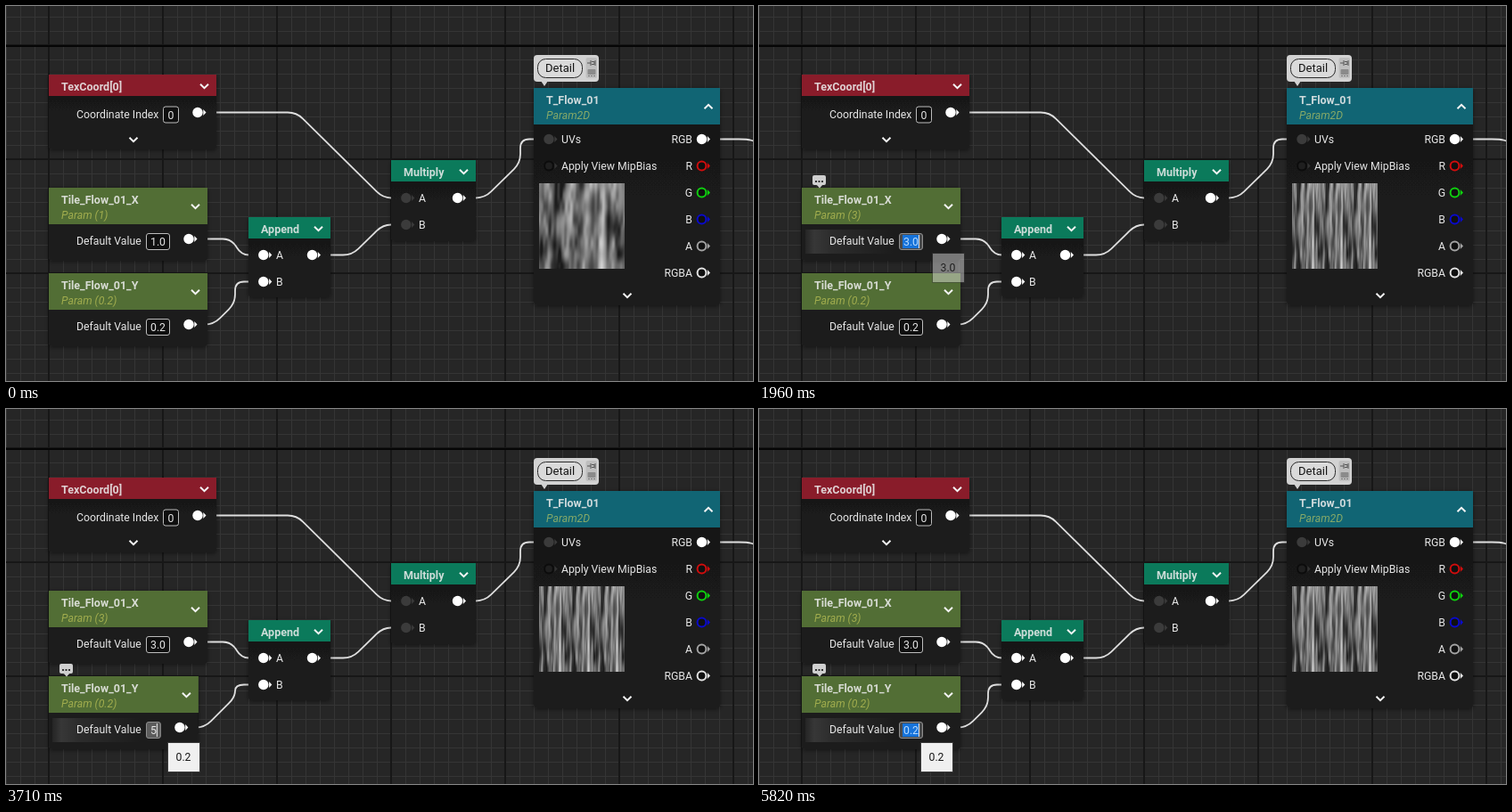
Animation, 838 px wide and 421 px high, one loop 5.84 s. Source, as an HTML page with a canvas:

```html
<!DOCTYPE html>
<html lang="en">
<head>
<meta charset="utf-8">
<title>Material graph</title>
<style>
  html, body { margin: 0; width: 100%; height: 100%; overflow: hidden; background: #262626; }
  svg, canvas { position: absolute; display: block; }
  svg { left: 0; top: 0; }
  canvas { left: 598px; top: 199px; }
  text { font: 12.25px Roboto, "Open Sans", sans-serif; fill: #e6e6e6; white-space: pre; }
  .title { font-weight: 700; font-size: 12.5px; fill: rgba(238, 238, 238, .86); }
  .sub { font-style: italic; fill: rgba(218, 218, 96, .58); }
  .end { text-anchor: end; }
  .dark { fill: #151515; }
  .big { font-size: 13px; }
  .note { fill: #666; }
  .wire { fill: none; stroke: #dedede; stroke-width: 1.8; }
  .chevron { fill: none; stroke: #f4f4f4; stroke-width: 2; }
</style>
</head>
<body>
<svg id="stage" width="838" height="421" viewBox="0 0 838 421">
  <defs>
    <pattern id="grid" width="16" height="16" y="12" patternUnits="userSpaceOnUse">
      <path d="M0 .5H16M.5 0V16" stroke="#353535"/>
    </pattern>
    <pattern id="rules" width="128" height="128" x="47" y="43" patternUnits="userSpaceOnUse">
      <path d="M0 1H128M1 0V128" stroke="#171717" stroke-width="2"/>
    </pattern>
    <linearGradient id="rowGlow">
      <stop offset="0" stop-color="#fff" stop-opacity=".04"/>
      <stop offset=".1" stop-color="#fff" stop-opacity=".12"/>
      <stop offset=".3" stop-color="#fff" stop-opacity=".07"/>
      <stop offset="1" stop-color="#fff" stop-opacity="0"/>
    </linearGradient>
    <linearGradient id="body" x2="0" y2="1">
      <stop offset="0" stop-color="#171717"/>
      <stop offset="1" stop-color="#1d1d1d"/>
    </linearGradient>
    <filter id="shadow" x="-20%" y="-20%" width="140%" height="140%">
      <feDropShadow dx="0" dy="1" stdDeviation="2.5" flood-color="#000" flood-opacity=".5"/>
    </filter>
  </defs>
  <rect width="838" height="421" fill="#262626"/>
  <rect width="838" height="421" fill="url(#grid)"/>
  <rect width="838" height="421" fill="url(#rules)"/>
  <rect y="44" width="838" height="2" fill="#060606"/>
</svg>
<canvas id="preview" width="96" height="96"></canvas>
<script>
const LOOP = 5840;
const stage = document.getElementById('stage');

function add(parent, tag, attrs = {}, text) {
  const el = document.createElementNS('http://www.w3.org/2000/svg', tag);
  set(el, attrs);
  if (text !== undefined) el.textContent = text;
  parent.append(el);
  return el;
}
function set(el, attrs) {
  for (const key in attrs) el.setAttribute(key, attrs[key]);
}
const group = parent => add(parent, 'g');
const label = (parent, x, y, text, cls = '') => add(parent, 'text', { x, y, class: cls }, text);
const move = (el, x, y = 0) => set(el, { transform: `translate(${x} ${y})` });
const ramp = (t, from, to) => Math.min(1, Math.max(0, (t - from) / (to - from)));

// ---- wires ----
function rounded(points, radius = 10) {
  let d = `M${points[0]}`;
  for (let i = 1; i < points.length - 1; i++) {
    const [x, y] = points[i];
    const near = ([px, py]) => {
      const len = Math.hypot(px - x, py - y), r = Math.min(radius, len / 2) / len;
      return [x + (px - x) * r, y + (py - y) * r];
    };
    d += `L${near(points[i - 1])}Q${x},${y} ${near(points[i + 1])}`;
  }
  return d + `L${points[points.length - 1]}`;
}
const wires = group(stage);
const wire = (...points) => add(wires, 'path', { class: 'wire', d: rounded(points) });

wire([225, 119.5], [326, 119.5], [423, 215.5], [441, 215.5]);
wire([354, 279.5], [388, 279.5], [423, 245.5], [441, 245.5]);
wire([516, 215.5], [537, 215.5], [577, 176], [577, 149.5], [600, 149.5]);
wire([790, 149.5], [832, 149.5], [840, 152]);
const wireX = wire([0, 0], [1, 1]);
const wireY = wire([0, 0], [1, 1]);

function placeWires(dx, dy) {
  const a = 253 + dx;
  set(wireX, { d: rounded([[200, 261.5], [a, 261.5], [Math.min(a + 18, 264), 279.5], [281, 279.5]]) });
  const b = 233 + dy;
  set(wireY, { d: rounded([[190, 357.5], [b, 357.5], [257, 100.5 + b], [257, 309.5], [281, 309.5]]) });
}

// ---- node parts ----
function frame(x, y, w, h, headH, color) {
  const g = group(stage);
  const body = add(g, 'rect', { x, y, width: w, height: h, rx: 4, fill: 'url(#body)', filter: 'url(#shadow)' });
  const head = add(g, 'rect', { x, y, width: w, height: headH, fill: color });
  return { g, parts: [body, head] };
}
const chevron = (parent, x, y, up = 1) =>
  add(parent, 'path', { class: 'chevron', d: `M${x - 4.5} ${y - 2.2 * up}L${x} ${y + 2.2 * up}L${x + 4.5} ${y - 2.2 * up}` });

function pin(parent, x, y, color = '#fff', ring = false) {
  add(parent, 'circle', ring
    ? { cx: x, cy: y, r: 4.9, fill: '#101010', stroke: color, 'stroke-width': 2 }
    : { cx: x, cy: y, r: 5.7, fill: color });
  add(parent, 'path', { d: `M${x + 6.3} ${y - 3.4}L${x + 9.5} ${y}L${x + 6.3} ${y + 3.4}z`, fill: color });
}
const inputBox = (parent, x, y, w) => add(parent, 'rect',
  { x: x + .5, y: y + .5, width: w - 1, height: 18, rx: 2.5, fill: '#0f0f0f', stroke: '#bdbdbd' });

// ---- fixed nodes ----
{
  const { g } = frame(48, 77, 188, 84, 24, '#891c2a');
  label(g, 62, 95, 'TexCoord[0]', 'title');
  chevron(g, 222.5, 90);
  label(g, 79, 126, 'Coordinate Index');
  inputBox(g, 176, 112.5, 18);
  label(g, 181.5, 126.5, '0');
  pin(g, 215, 119.5);
  chevron(g, 143, 150);
}
function mathNode(x, y, w, h, name, pinColor) {
  const { g } = frame(x, y, w, h, 24, '#0b7a5b');
  label(g, x + 14, y + 18, name, 'title');
  chevron(g, x + w - 13.5, y + 13);
  ['A', 'B'].forEach((side, i) => {
    const py = y + 42.5 + 30 * i;
    pin(g, x + 16.8, py, pinColor);
    label(g, x + 31, py + 4.5, side);
  });
  pin(g, x + w - 20.5, y + 42.5);
}
mathNode(272, 237, 92, 90, 'Append', '#fff');
mathNode(432, 173, 95, 91, 'Multiply', '#3b3b3b');
{
  const { g } = frame(592, 92, 209, 244, 41, '#116574');
  label(g, 606, 110, 'T_Flow_01', 'title');
  label(g, 606, 127, 'Param2D', 'sub');
  chevron(g, 788, 113, -1);
  pin(g, 609, 149.5, '#3b3b3b');
  label(g, 623, 154, 'UVs');
  add(g, 'path', { d: 'M615.3 176L618.5 179.5L615.3 183z', fill: '#333' });
  add(g, 'circle', { cx: 609, cy: 179.5, r: 4.9, fill: '#1f1f1f', stroke: '#0c0c0c', 'stroke-width': 2 });
  label(g, 623, 184, 'Apply View MipBias');
  const outs = { RGB: '#fff', R: '#d00d0d', G: '#0fd00f', B: '#0a0acc', A: '#a3a3a3', RGBA: '#e4e4e4' };
  Object.entries(outs).forEach(([name, color], i) => {
    const y = 149.5 + 30 * i;
    label(g, 770, y + 4.5, name, 'end');
    pin(g, 780.5, y, color, i > 0);
  });
  chevron(g, 697, 325);
}

// ---- "Detail" comment ----
{
  const g = group(stage);
  add(g, 'path', { d: 'M600 84H608L604 90z', fill: '#d2d2d2' });
  add(g, 'rect', { x: 592, y: 55, width: 73, height: 30, rx: 4, fill: '#d2d2d2' });
  add(g, 'rect', { x: 596.5, y: 59.5, width: 50, height: 21, rx: 9, fill: '#dadada', stroke: '#2b2b2b' });
  label(g, 605, 74.3, 'Detail', 'dark big');
  add(g, 'rect', { x: 650.5, y: 58, width: 12.5, height: 23, rx: 2, fill: '#bebebe' });
  add(g, 'path', { d: 'M652 64H656M656 61V67M657 62.5H660V65.5H657M661 61V67', stroke: '#555', fill: 'none' });
  add(g, 'path', { d: 'M653 72.5H661M653 78.5H661', stroke: '#777', 'stroke-dasharray': '2 1' });
  add(g, 'rect', { x: 652.5, y: 71, width: 9, height: 6, rx: 1, fill: '#8b8b8b' });
}

// ---- editable parameter nodes ----
const textWidth = s => [...s].reduce((w, c) => w + (c === '.' ? 3.2 : 6.9), 0);

function paramNode(y, name) {
  const { g, parts } = frame(48, y, 178, 82, 41, '#526e35');
  label(g, 62, y + 18, name, 'title');
  const sub = label(g, 62, y + 34.5, '', 'sub');
  const glow = add(g, 'rect', { x: 52, y: y + 47, width: 100, height: 27, fill: 'url(#rowGlow)' });
  label(g, 79, y + 64, 'Default Value');
  const box = inputBox(g, 157, y + 51, 27);
  const mark = add(g, 'rect', { x: 161, y: y + 53, height: 15, fill: '#1673da' });
  const value = label(g, 162, y + 64.5, '');
  const caret = add(g, 'rect', { y: y + 53, width: 1, height: 15, fill: '#e9e9e9' });
  const right = group(g);
  chevron(right, 212.5, y + 21);
  pin(right, 205, y + 57.5);

  const bubble = group(stage);
  add(bubble, 'path', { d: `M64 ${y - 4}H72L68 ${y + .5}z`, fill: '#cfcfcf' });
  add(bubble, 'rect', { x: 60, y: y - 14, width: 15, height: 11, rx: 2, fill: '#cfcfcf' });
  for (const x of [63, 66.5, 70]) add(bubble, 'rect', { x, y: y - 8, width: 2, height: 2, fill: '#333' });

  return {
    // Returns how far the right side moved with the value's width.
    update({ text, mode, param, hover, caretAlpha, bubbleAlpha }) {
      const w = textWidth(text), shift = w - 17;
      const active = mode !== 'idle';
      parts.forEach(p => set(p, { width: 178 + shift }));
      set(box, { width: w + 9, fill: active ? (mode === 'select' ? '#4a4a4a' : '#5c5c5c') : '#0f0f0f',
                 stroke: active ? '#8f8f8f' : '#bdbdbd' });
      set(mark, { width: w + 2, opacity: mode === 'select' ? 1 : 0 });
      set(caret, { x: mode === 'press' ? 172 : 162 + w, opacity: active ? caretAlpha : 0 });
      value.style.fill = mode === 'select' ? '#b9dcff' : mode === 'press' ? '#b5b5b5' : '';
      value.textContent = text;
      sub.textContent = `Param (${param})`;
      set(glow, { opacity: hover ? 1 : 0 });
      set(bubble, { opacity: bubbleAlpha });
      move(right, shift);
      return shift;
    }
  };
}
const nodeX = paramNode(204, 'Tile_Flow_01_X');
const nodeY = paramNode(300, 'Tile_Flow_01_Y');

// ---- tooltips ----
function tooltip(w, h, lines) {
  const g = group(stage);
  add(g, 'rect', { x: .5, y: .5, width: w - 1, height: h - 1, fill: '#f0f0f0', stroke: '#3a3a3a' });
  const texts = lines.map(([y, text, cls]) => label(g, 9.5, y, text, cls));
  return (alpha, x, y, text) => {
    set(g, { opacity: alpha });
    move(g, x, y);
    if (text) texts[0].textContent = text;
  };
}
const bigTip = tooltip(140, 64, [[20, "'Tile_Flow_01_Y'", 'dark'], [34, 'Param (0.2)', 'dark'],
                                 [52.5, 'hold (Ctrl + Alt) for more', 'note']]);
const tipX = tooltip(37, 34, [[21, '', 'dark']]);
const tipY = tooltip(37, 34, [[21, '', 'dark']]);

// ---- tiling flow texture ----
const wrap = (n, m) => ((n % m) + m) % m;
function hash(x, y, seed) {
  let n = Math.imul(x + 1, 374761393) ^ Math.imul(y + 1, 668265263) ^ Math.imul(seed, 974634781);
  n = Math.imul(n ^ (n >>> 13), 1274126177);
  return ((n ^ (n >>> 16)) >>> 0) / 4294967296;
}
function noise(u, v, nx, ny) {
  const x = u * nx, y = v * ny, ix = Math.floor(x), iy = Math.floor(y);
  const ease = f => f * f * (3 - 2 * f);
  const fx = ease(x - ix), fy = ease(y - iy);
  const at = (i, j) => hash(wrap(ix + i, nx), wrap(iy + j, ny), nx);
  const top = at(0, 0) + (at(1, 0) - at(0, 0)) * fx;
  const low = at(0, 1) + (at(1, 1) - at(0, 1)) * fx;
  return top + (low - top) * fy;
}
const streaks = [.11, .32, .55, .72, .86];
function flow(u, v) {
  const bend = u + .02 * Math.sin(2 * Math.PI * (v - .1));
  const ridge = streaks.reduce((s, c) => {
    const d = wrap(bend - c + .5, 1) - .5;
    return s + Math.exp(-d * d / .0024);
  }, 0);
  const near = .5 + .5 * Math.cos(2 * Math.PI * (v - .1));
  const cloud = .4 * noise(bend, v, 8, 10) + .35 * noise(bend, v, 16, 20) + .25 * noise(bend, v, 32, 36);
  return 255 * Math.min(.88, Math.max(.1, .42 + 1.1 * (cloud - .5) + .28 * near * (ridge - .5)));
}
const preview = document.getElementById('preview').getContext('2d');
function bake(tileX, tileY) {
  const image = preview.createImageData(96, 96);
  for (let p = 0; p < 96 * 96; p++) {
    const x = p % 96, y = Math.floor(p / 96);
    let sum = 0;
    for (const ox of [.25, .75]) for (const oy of [.25, .75])
      sum += flow((x + ox) / 96 * tileX, (y + oy) / 96 * tileY);
    image.data.set([sum / 4, sum / 4, sum / 4, 255], p * 4);
  }
  return image;
}
const textures = { wide: bake(1, .2), narrow: bake(3, .2), dense: bake(3, 5) };

// ---- timeline ----
const at = (keys, t) => keys.reduce((now, key) => (t >= key[0] ? key : now));
const editX = [[0, '1.0', 'idle'], [910, '1.0', 'press'], [930, '1.0', 'select'], [1510, '3', 'type'],
               [1770, '3.0', 'select'], [3070, '3.0', 'idle']];
const editY = [[0, '0.2', 'idle'], [3070, '0.2', 'select'], [3640, '5', 'type'], [3820, '5.0', 'select'],
               [4850, '.', 'type'], [4890, '.2', 'type'], [5090, '0.2', 'select']];
const blink = [[0, 1], [3370, .5], [3400, 0], [3640, 1], [4060, 0], [4550, 1], [5330, 0], [5820, 1]];
const tiling = [[0, 'wide'], [1770, 'narrow'], [3820, 'dense'], [5090, 'narrow']];
const tipText = [[0, '0.2'], [3840, '5.0'], [5110, '0.2']];
const between = (t, from, to) => t >= from && t < to;

let shown;
function render(t) {
  const [, textX, modeX] = at(editX, t);
  const [, textY, modeY] = at(editY, t);
  const dx = nodeX.update({
    text: textX, mode: modeX, param: t < 1770 ? '1' : '3', hover: between(t, 700, 2510),
    caretAlpha: 1, bubbleAlpha: ramp(t, 950, 1110) - ramp(t, 2510, 2670)
  });
  const dy = nodeY.update({
    text: textY, mode: modeY, param: between(t, 3820, 5090) ? '5' : '0.2',
    hover: between(t, 330, 370) || t >= 2970,
    caretAlpha: at(blink, t)[1], bubbleAlpha: ramp(t, 2970, 3150)
  });
  placeWires(dx, dy);

  if (t < 1620) {
    const slide = 1 - ramp(t, 970, 1110);
    tipX(ramp(t, 950, 1110), 194 + 14 * slide, 277 + 2 * slide, '1.0');
  } else {
    tipX(t < 2510 ? ramp(t, 1900, 2040) : 0, 194, 277, '3.0');
  }
  tipY(ramp(t, 3090, 3150), 181, 374, at(tipText, t)[1]);

  if (t < 2000) {
    bigTip(between(t, 540, 560) ? .2 : 0, 223, 316);
  } else {
    const drift = ramp(t, 2830, 2930);
    bigTip(t < 2950 ? ramp(t, 2750, 2900) : 0, 209 - 4 * drift, 349 + 8 * drift);
  }

  const texture = at(tiling, t)[1];
  if (texture !== shown) {
    preview.putImageData(textures[texture], 0, 0);
    shown = texture;
  }
}

const start = performance.now();
function tick() {
  render((performance.now() - start) % LOOP);
  requestAnimationFrame(tick);
}
tick();
</script>
</body>
</html>
```
